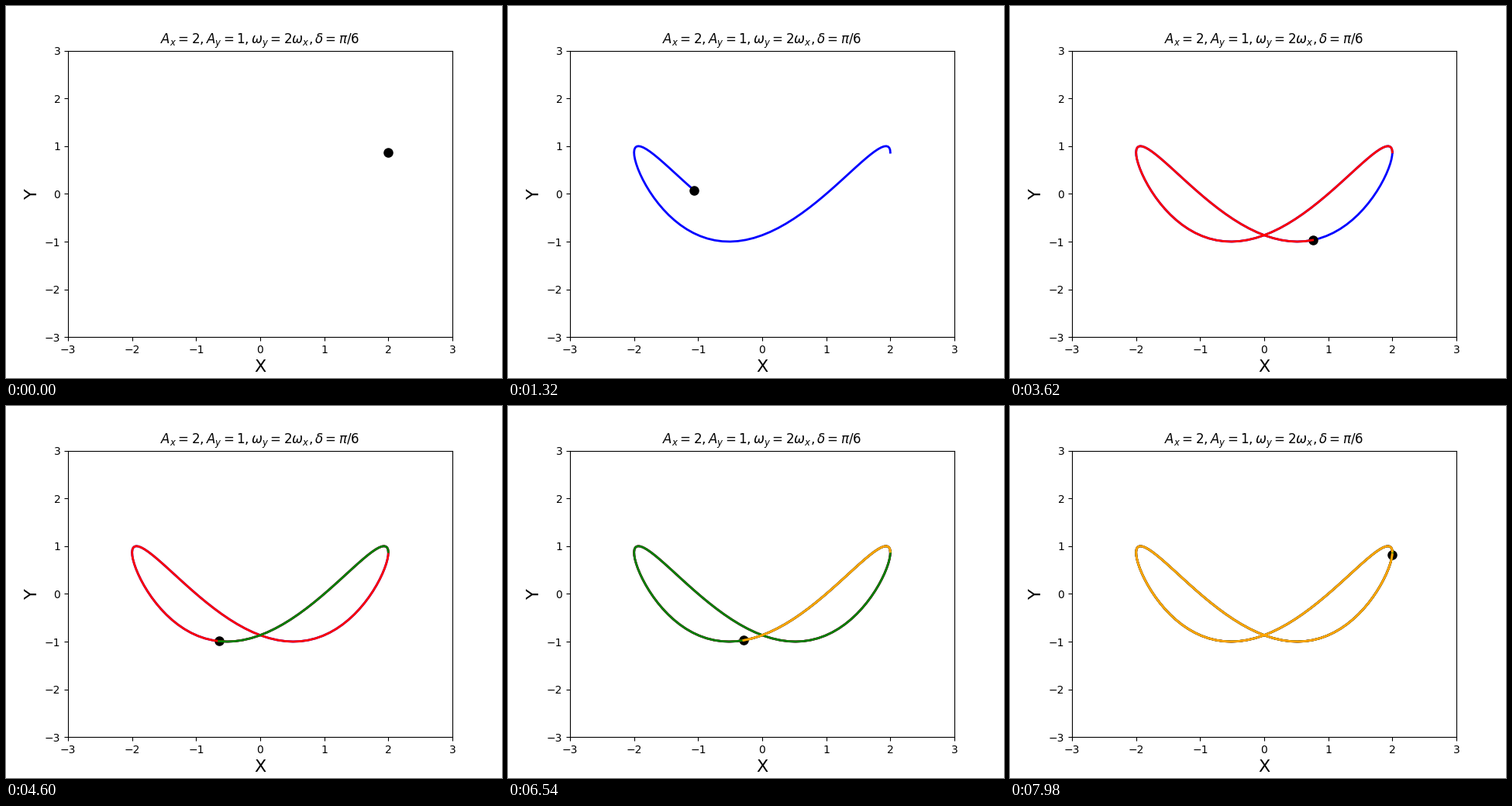
Write a matplotlib script that moves like this. It is 640 by 480 pixels and loops after 8 s.

```python
import numpy as np
import matplotlib.pyplot as plt
from matplotlib.animation import FuncAnimation

FRAMES = 400
CYCLE = 100  # frames drawn in each colour
COLORS = ("blue", "red", "green", "orange")

t = np.linspace(0, 10, 1000)
omega = 2 * np.pi
x = 2 * np.cos(omega * t)
y = np.cos(2 * omega * t - np.pi / 6)

fig, ax = plt.subplots(figsize=(6.4, 4.8), dpi=100)
ax.set_xlim(-3, 3)
ax.set_ylim(-3, 3)
ax.set_xlabel("X", fontsize=16)
ax.set_ylabel("Y", fontsize=16)
ax.set_title(r"$A_x=2, A_y=1, \omega_y=2\omega_x, \delta=\pi/6$")

# The dot sits above the first trail and below the later ones.
trails = [ax.plot([], [], color=c, lw=2, zorder=2 + k)[0]
          for k, c in enumerate(COLORS)]
dot, = ax.plot([], [], "o", color="black", ms=8, zorder=2.5)


def update(i):
    for k, trail in enumerate(trails):
        start = k * CYCLE
        stop = min(i, start + CYCLE) + 1
        part = slice(start, stop) if i > start else slice(0, 0)
        trail.set_data(x[part], y[part])
    dot.set_data([x[i]], [y[i]])
    return [*trails, dot]


anim = FuncAnimation(fig, update, frames=FRAMES, interval=20,
                     repeat=True, repeat_delay=0, blit=False)
plt.show()
```
